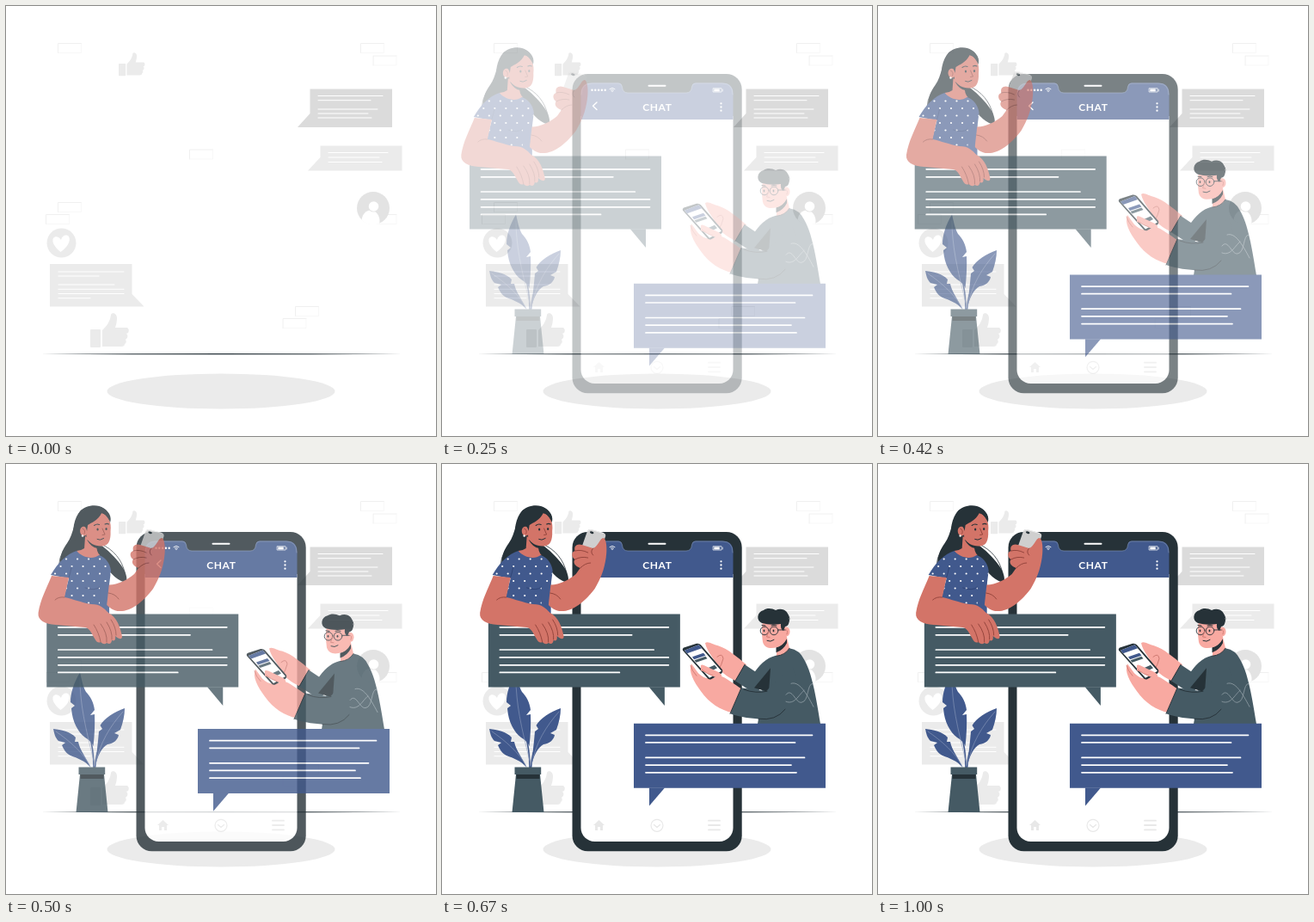
Animation, 500 px wide and 500 px high, one loop 1040 ms. Source, as an HTML page with a canvas:

```html
<!DOCTYPE html>
<html lang="en">
<head>
<meta charset="utf-8">
<title>Chat</title>
<style>
html, body { margin: 0; width: 100%; height: 100%; overflow: hidden; background: #fff; }
canvas { display: block; width: 500px; height: 500px; }
</style>
</head>
<body>
<canvas id="stage"></canvas>
<script>
const LOOP = 1040, FPS = 24;
const NAVY = '#41598d', SLATE = '#455a64', DARK = '#263238';
const SKIN = '#d37468', SKIN_LINE = '#8f4139', PINK = '#f8a9a1', PINK_LINE = '#c9736b';
const GREY = '#ebebeb', MID = '#e3e3e3';

const stage = document.getElementById('stage');
const layer = document.createElement('canvas');
const ratio = window.devicePixelRatio || 1;
stage.width = stage.height = layer.width = layer.height = Math.round(500 * ratio);
const main = stage.getContext('2d'), over = layer.getContext('2d');
let c = main;

function fill(d, color) {
  c.fillStyle = color;
  c.fill(new Path2D(d));
}

function line(d, color, width = 1) {
  c.strokeStyle = color;
  c.lineWidth = width;
  c.lineCap = c.lineJoin = 'round';
  c.stroke(new Path2D(d));
}

function rect(x, y, w, h, color, r = 0) {
  c.fillStyle = color;
  c.beginPath();
  c.roundRect(x, y, w, h, r);
  c.fill();
}

function oval(x, y, rx, ry, color, turn = 0) {
  c.fillStyle = color;
  c.beginPath();
  c.ellipse(x, y, rx, ry, turn, 0, 7);
  c.fill();
}

const dot = (x, y, r, color) => oval(x, y, r, r, color);

// rows: [y, right end]
function textRows(x, rows, width) {
  for (const [y, end] of rows) line(`M${x} ${y}H${end}`, '#fff', width);
}

function brick(x, y) {
  line(`M${x} ${y + 11}V${y}H${x + 27}`, '#ededed', .8);
  line(`M${x + 27} ${y}V${y + 11}H${x}`, '#f5f5f5', .7);
}

function thumb(x, y, s) {
  c.save();
  c.translate(x, y);
  c.scale(s, s);
  rect(0, 19, 12, 21, GREY, 1);
  fill('M14 20C18 16 23 11 24 2C25 -1 31 0 31 6C31 10 30 14 29 17H43Q46 19 44 23L42 24Q45 27 42 30L41 31Q43 34 40 36Q40 39 36 39H14Z', GREY);
  c.restore();
}

function backdrop() {
  for (const [x, y] of [[60.5, 43.5], [412.5, 43.5], [427, 58], [213.5, 167], [60.5, 228.5],
    [46.5, 242.5], [336.5, 349.5], [322, 363.5], [427, 242.5]]) brick(x, y);

  thumb(131, 54, .68);
  thumb(98, 357, 1);

  fill('M353.5 96.5H449V141H339L353.5 125Z', '#dbdbdb');
  textRows(363, [[104.5, 438], [109.7, 424], [120, 432], [125, 421], [130, 425]], 1);
  fill('M365.5 162.5H460.5V191.5H351L365.5 176Z', GREY);
  textRows(375, [[170.5, 444], [176, 434], [181.5, 437]], 1);
  fill('M51 300H146.5V335L160.5 349.5H51Z', GREY);
  textRows(61, [[309, 137], [314, 108], [324, 126], [329.3, 137], [334.5, 137], [339.7, 98]], 1);

  dot(427, 235, 19, MID);
  c.save();
  c.beginPath();
  c.arc(427, 235, 19.5, 0, 7);
  c.clip();
  oval(424, 250, 10.5, 12.5, '#fff');
  dot(427.5, 233, 6.6, MID);
  dot(427.5, 233, 5.8, '#fff');
  c.restore();

  dot(64.5, 275.5, 17, GREY);
  fill('M63.500 286C56 280 53 274 55 270C57 267 62 268 64 272C65 267 70 265 73 268C76 273 71 281 63.500 286Z', '#fff');

  oval(250, 448, 132.5, 20.5, GREY);
  fill('M41 404.700Q250 403.400 460 404.700Q250 406 41 404.700Z', DARK);
}

function phone() {
  rect(151.5, 79, 197.2, 371.3, DARK, 18);
  rect(161.5, 128, 177, 311, '#fff', [0, 0, 16, 16]);
  fill('M161.500 132V102Q161.500 89.500 174 89.500H205Q209 89.500 209.500 94Q210 101 216 101H284Q290 101 290.500 94Q291 89.500 295 89.500H326Q338.500 89.500 338.500 102V132Z', NAVY);
  line('M162 103Q162 90 174 90H205Q209 90 209.500 94Q210 101 216 101H284Q290 101 290.500 94Q291 90 295 90H326Q338 90 338 103', '#8495b8', .6);
  line('M240.500 92.700H259.500', '#fff', 2);
  for (let i = 0; i < 5; i++) dot(174.5 + i * 3.8, 97.7, 1.2, '#fff');
  line('M195 96.500Q198 94 201 96.500M196.500 98Q198 96.800 199.500 98', '#fff', .9);
  dot(198, 99.4, .7, '#fff');
  line('M315.500 95.700H325V100H315.500ZM326.300 97V99', '#fff', .7);
  rect(316.3, 96.4, 6.5, 3, '#fff');
  line('M180 112L175.500 116.300L180 120.500', '#fff', 1.4);
  c.fillStyle = '#fff';
  c.font = 'bold 12px Lato, sans-serif';
  c.letterSpacing = '0.6px';
  c.textAlign = 'center';
  c.textBaseline = 'alphabetic';
  c.fillText('CHAT', 250.3, 122.3);
  for (const y of [113.3, 117.5, 121.7]) dot(324.5, y, 1.15, '#fff');

  const icon = '#e8e8e8';
  fill('M176 420L182.500 414L189 420H187V426H184V422H181V426H178V420Z', icon);
  c.strokeStyle = icon;
  c.lineWidth = 1.2;
  c.beginPath();
  c.arc(250, 420.3, 7, 0, 7);
  c.stroke();
  line('M246.500 419.500L250 422.500L253.500 419.500', icon, 1.3);
  for (const y of [414.7, 420, 425.3]) line(`M310 ${y}H323`, icon, 1.8);
}

function plant() {
  line('M102 354C102 340 101 328 97 316M103.500 354C104 342 106 332 112 322', NAVY, 1.6);
  fill('M86 242.500C79 254 75 266 75 277L80 281L76 284C77 300 84 312 92 318C97 321 100 324 101.500 328C103 315 103.500 302 103 291L98 292L103 286C102 277 98 270 93 265C89 258 88 250 86 242.500Z', NAVY);
  fill('M138 284C126 288 114 296 109.500 304L112 308L108 311C107 324 105 338 104 352C106 340 111 330 118 326C125 325 130 321 131 315L126 313L133 309C136 301 138 292 138 284Z', NAVY);
  fill('M55 308C64 309 75 311 81 318L80 323L84 323C86 333 93 341 98.500 353C92 345 83 342 75 339C69 336 67 331 65 327L69 324L61 322C57 318 56 313 55 308Z', NAVY);
  line('M86 250C86 278 92 306 102 345M136 288C121 305 109 324 104 350M58 311C74 322 90 336 98 351', '#8e9dbd', .6);
  fill('M86 361H114L118.500 405H81.500Z', SLATE);
  rect(86.5, 360.5, 27, 5.5, DARK);
  rect(84.5, 352.5, 30.7, 8.5, SLATE);
}

function blouse() {
  const shape = 'M91 101C79 105 69 115 61 129L82 133L76 156V176H129V140L131 124C130 115 124 108 117 106C109 112 97 108 91 101Z';
  fill(shape, NAVY);
  c.save();
  c.clip(new Path2D(shape));
  for (let row = 0; row < 7; row++)
    for (let i = 0; i < 6; i++)
      dot(66 + i * 13 + row % 2 * 6.5, 110.5 + row * 8.5, 1.1, '#fff');
  c.restore();
  line('M82 132Q84 126 85 120M101 144Q112 148 118 143', '#2c4172', .8);
}

function girl() {
  // hair behind the body
  fill('M95 55C103 46 125 44 130 62L119 94C127 100 135 107 143 118C149 126 150 133 149 138C140 137 131 128 122 116L91 103C80 108 76 114 72 121C70 109 75 99 80 92C88 81 88 65 95 55Z', DARK);
  line('M80 94Q68 109 71 126M119 93C134 99 144 112 147 126', DARK, .8);
  fill('M101 84L100 98Q96 101 91 101C96 111 111 113 118 106Q114 102 114 93Z', SKIN);
  fill('M103 88Q108 97 115 98V94Z', DARK);
  blouse();

  // face
  fill('M102 70C108 68 116 64 120 57C128 59 132 68 130.500 78C131 89 128 95 121 95.500C112 96 106 92 102.500 86Z', SKIN);
  oval(99.5, 78, 4.5, 5.5, SKIN);
  line('M98 75Q102 77 100 81', SKIN_LINE, .8);
  dot(98, 83.5, 1.2, '#fff');
  fill('M96 54C105 47 123 47 129 58C131 62 131 65 130 68C128 62 124 58 120 57C116 66 108 68 104 71L103 78Q102 72 98 72Q93 74 95 82L89 89C85 78 88 62 96 54Z', DARK);
  oval(115.5, 76, 1.1, 1.6, DARK);
  oval(125.5, 75.5, 1.1, 1.6, DARK);
  line('M111.500 71.500Q114.500 69 117.500 70.500M124 70Q126.500 68.700 128.500 70', DARK, 1.1);
  line('M121 75L124 82L121 82.500', SKIN_LINE, .9);
  line('M115 87.500Q118 89.500 122.500 86.500', DARK, 1);

  // handset and raised arm
  fill('M171 79Q172 75.500 175 76L190 80Q193 81 192.500 84L186 103L165 96Z', '#cfcfcf');
  line('M172 78Q173 76 176 76.500L190 80.500', '#ededed', 1);
  oval(176.5, 79.7, 2.3, 1.3, DARK, .3);
  fill('M125 140C135 142 149 136 158 128L163 121C157 119 154 114 157 111C153 109 152 102 157 101C155 95 160 92 165 94L178 98C184 96 186 86 190 86C194 87 194.500 101 193 109C191 123 187 133 180 145C171 157 157 170 144 171C133 172 129 166 126 164Z', SKIN);
  fill('M118 140L129 138L126 165L118 170Z', NAVY);
  line('M157 101Q164 99 172 103M157 111Q164 107 172 109M163 121Q169 115 175 115M178 98Q174 102 178 106M140 157Q136 151 128 150', SKIN_LINE, .9);
}

function leftSide() {
  girl();
  rect(56.2, 174.5, 223, 85, SLATE);
  fill('M243 259.200H261.200V281Z', SLATE);
  textRows(69.7, [[189.8, 265.700], [198.8, 223], [216, 248.500], [224.9, 265.700], [233.8, 265.700], [242.4, 208.700]], 1.7);

  // resting arm
  fill('M62 130C56 145 49 157 46.500 173C45.500 182 54 186 67 187L101 190C106 191 108 196 112 203Q115 209 119 207Q123 211 126 208Q131 211 132 205Q137 207 136 200Q143 206 144 201C142 190 138 178 128 173C123 168 119 163 108 163C96 161 87 157 77 155L82 132Z', SKIN);
  line('M77 155Q70 154 66 158M111 187Q117 196 119 207M119 186Q127 197 126 207M126 184Q133 195 132 204M131 181Q137 190 137 199', SKIN_LINE, .9);
}

function handset() {
  fill('M280 214.500Q279 212 282 211L296 206.500Q299 206 301 208L326 237Q327 240 324 242L313 248Q310 249 308 246Z', DARK);
  fill('M282 214.500L298.500 208L325 238.500L311 246.500Z', '#fff');
  fill('M282 214.500L298.500 208L302 212L285 218Z', NAVY);
  fill('M291 222L304 217.500L306.500 220.500L293 225Z', NAVY);
  fill('M293.500 226L306.500 221.500L308.500 224L295.500 228.500Z', SLATE);
  fill('M308 235.500L317 231.500L320 235L311 239.500Z', SLATE);
}

function man() {
  // far arm
  fill('M306 206C309 203 315 208 321 209C333 213 343 222 354 231L344 251C335 247 326 242 321 234C318 226 308 216 306 206Z', PINK);
  line('M320 222Q326 217 327 224Q325 232 322 236', PINK_LINE, .9);
  fill('M352 231L341 250L364 265L390 240L391 220Q376 222 364 239Z', SLATE);
  line('M352 231L341 250', DARK, 1);

  // neck and body
  fill('M389 205L389 222Q399 222 404 212L400 195Z', PINK);
  fill('M388.500 211Q396 210 401 201V206Q397 214 388.500 217Z', DARK);
  fill('M389 221Q399 220 404 212Q416 214 421 225C430 240 435 268 440 300H367L371 276Q372 241 389 221Z', SLATE);
  line('M389 221Q399 220 404 212', DARK, .9);
  fill('M382 235L363 258L380 263Z', DARK);

  // near arm
  fill('M290 230C286 239 293 251 301 262C311 276 324 284 338 287L350 260C339 254 330 245 322 244C314 248 306 249 298 241Z', PINK);
  handset();
  fill('M301 234Q300 230 305 232L322 240Q328 244 323 247C312 245 309 240 301 238Z', PINK);
  line('M302 237Q308 242 315 244M289 232Q291 239 296 244', PINK_LINE, .8);
  fill('M348 258L335 288C349 293 367 295 381 294C398 289 406 273 413 251L408 234C397 241 387 251 377 262Z', SLATE);
  line('M348 258L335 288M351 260Q365 265 378 262M368 294Q388 297 399 283', DARK, .9);
  line('M400 266C407 257 411 276 418 275C427 274 424 253 431 253M406 253C415 250 423 263 432 280M400 274C410 278 414 267 421 261', '#9caab0', .7);

  // head
  c.save();
  c.translate(0, -1.3);
  fill('M373 183C371 190 372 198 373 206C375 214 383 214 390 212C397 209 400 203 400 196L399 181Z', PINK);
  oval(400.5, 194, 4, 5.5, PINK);
  line('M399 192Q403 191 401 197', PINK_LINE, .8);
  fill('M372 184C365 181 366 171 374 169C378 166 384 167 388 169C396 165 404 171 403 178C405 184 402 188 399 188L397 193Q393 190 394 185Q382 187 372 184Z', DARK);
  line('M402 174Q406 179 402 184', DARK, 1);
  c.strokeStyle = DARK;
  c.lineWidth = .9;
  for (const x of [375, 386]) {
    c.beginPath();
    c.arc(x, 193, 4.8, 0, 7);
    c.stroke();
    oval(x - .5, 193, .9, 1.4, DARK);
  }
  line('M391 192L399 192', DARK, .9);
  line('M372 186.500L376 187M383 187Q386 185.500 389 187', DARK, 1);
  line('M380 193L377.500 200L381 200.500', PINK_LINE, .9);
  line('M378 204.500Q382 206.500 386 203.500', DARK, 1);
  c.restore();
}

function rightSide() {
  man();
  rect(223, 299.4, 223, 75, NAVY);
  fill('M241 374.200H259L241 395.200Z', NAVY);
  textRows(237, [[313.1, 430.500], [321.7, 410.500], [339.2, 421.500], [347.8, 406], [356.6, 412]], 1.7);
}

function group(draw, alpha, dx = 0, dy = 0) {
  c = over;
  c.setTransform(1, 0, 0, 1, 0, 0);
  c.clearRect(0, 0, layer.width, layer.height);
  c.setTransform(ratio, 0, 0, ratio, dx * ratio, dy * ratio);
  draw();
  c = main;
  c.globalAlpha = alpha;
  c.drawImage(layer, 0, 0, 500, 500);
  c.globalAlpha = 1;
}

function render(ms) {
  const step = Math.floor((ms % LOOP + 4.9) * FPS / 1000);
  const fade = Math.pow(Math.min(1, Math.max(0, (step - 1) / 13)), 1.35);
  // slow swing that turns at step 20
  const swing = 1 - Math.cos((step - 20) * Math.PI / 30);

  c = main;
  c.setTransform(ratio, 0, 0, ratio, 0, 0);
  c.fillStyle = '#fff';
  c.fillRect(0, 0, 500, 500);
  backdrop();
  if (fade > 0) {
    group(phone, fade);
    group(plant, fade);
    group(leftSide, fade, -27 * swing);
    group(rightSide, fade, 0, 26 * swing);
  }
}

const start = performance.now();
function tick() {
  render(performance.now() - start);
  requestAnimationFrame(tick);
}
tick();
</script>
</body>
</html>
```
